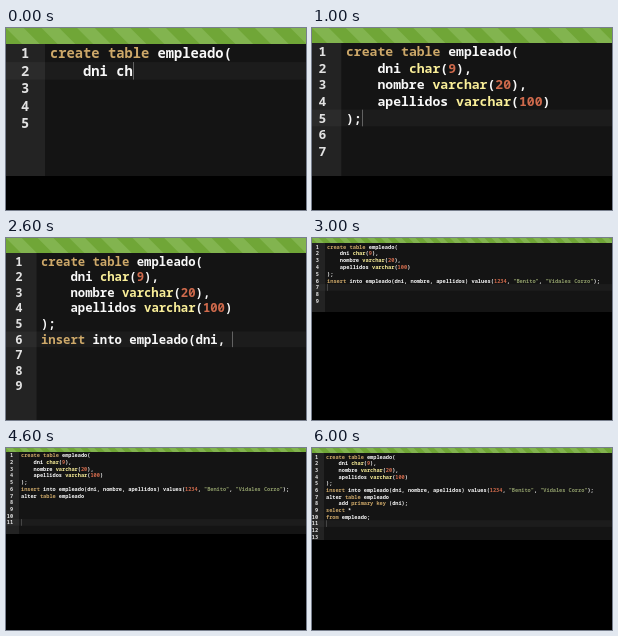
Animation of 300 by 182 pixels, one loop 7 s. Source, as an HTML page with a canvas:

```html
<!DOCTYPE html>
<html lang="es">
<head>
<meta charset="utf-8">
<title>SQL editor</title>
<style>
html, body { margin: 0; width: 100%; height: 100%; overflow: hidden; background: #000; }
canvas { display: block; }
</style>
</head>
<body>
<canvas id="stage" width="300" height="182"></canvas>
<script>
const ctx = document.getElementById('stage').getContext('2d');
const WIDTH = 300, HEIGHT = 182, HOLD = 1000;

const SCRIPT = [
  'create table empleado(',
  '    dni char(9),',
  '    nombre varchar(20),',
  '    apellidos varchar(100)',
  ');',
  'insert into empleado(dni, nombre, apellidos) values(1234, "Benito", "Vidales Corzo");',
  'alter table empleado',
  '    add primary key (dni);',
  'select * ',
  'from empleado;'
];

// x: text start, top: first row, cw: character width, rows: numbered rows,
// typed: [lines, characters of the last line], caret: [row, column]
const VIEWS = [
  { x: 44, top: 16.5, cw: 8.27, rows: 5, bottom: 148, typed: [2, 10], caret: [2, 10] },
  { x: 34, top: 15, cw: 7.86, rows: 7, bottom: 148, typed: [5, 2], caret: [5, 2] },
  { x: 35, top: 15.5, cw: 7.36, rows: 9, bottom: 182, typed: [6, 26], caret: [6, 26] },
  { x: 15, top: 5.2, cw: 3.21, rows: 9, bottom: 74, typed: [6, 85], caret: [7, 0] },
  { x: 15, top: 4.2, cw: 3.155, rows: 11, bottom: 86, typed: [7, 20], caret: [11, 0] },
  { x: 15, top: 4, cw: 3.08, rows: 12, bottom: 88, typed: [9, 9], caret: [9, 9] },
  { x: 14, top: 5.5, cw: 3.15, rows: 13, bottom: 92, typed: [10, 14], caret: [11, 0] }
];

const TOKEN = /"[^"]*"|\w+|[^\s\w"]+/g;
const RULES = [
  [/^"/, '#8f9d6a'],
  [/^\d+$/, '#cf6a4c'],
  [/^(create|table|insert|primary|key|select|from)$/, '#cda869'],
  [/^(var)?char$/, '#f9ee98']
];

function tokenColor(token) {
  const rule = RULES.find(([pattern]) => pattern.test(token));
  return rule ? rule[1] : '#f8f8f8';
}

function fill(color, x, y, w, h) {
  ctx.fillStyle = color;
  ctx.fillRect(x, y, w, h);
}

function drawHeader(height, cw) {
  const period = cw * 4.3;
  ctx.save();
  ctx.beginPath();
  ctx.rect(0, 0, WIDTH, height);
  ctx.clip();
  fill('#70a637', 0, 0, WIDTH, height);
  ctx.fillStyle = '#82b44f';
  for (let x = -period; x < WIDTH; x += period) {
    ctx.beginPath();
    ctx.moveTo(x, 0);
    ctx.lineTo(x + period / 2, 0);
    ctx.lineTo(x + period / 2 + height, height);
    ctx.lineTo(x + height, height);
    ctx.fill();
  }
  ctx.restore();
}

function drawView({ x, top, cw, rows, bottom, typed, caret }) {
  const step = cw * 2.12;
  const rowTop = row => top + (row - 1) * step;
  const baseline = row => rowTop(row) + step * 0.78;

  fill('#000', 0, 0, WIDTH, HEIGHT);
  fill('#141414', 0, 0, WIDTH, bottom);
  fill('#232323', 0, 0, x - cw * 0.6, bottom);
  fill('rgba(255,255,255,0.035)', 0, rowTop(caret[0]), WIDTH, step);
  drawHeader(Math.round(top - 0.3), cw);

  ctx.font = `600 ${cw / 0.6}px "Noto Sans Mono", monospace`;
  ctx.textAlign = 'right';
  ctx.fillStyle = '#e2e2e2';
  for (let row = 1; row <= rows; row++) ctx.fillText(row, x - cw * 2.5, baseline(row));

  ctx.textAlign = 'left';
  const [lines, lastLength] = typed;
  SCRIPT.slice(0, lines).forEach((line, i) => {
    const shown = i === lines - 1 ? line.slice(0, lastLength) : line;
    for (const match of shown.matchAll(TOKEN)) {
      ctx.fillStyle = tokenColor(match[0]);
      ctx.fillText(match[0], x + match.index * cw, baseline(i + 1));
    }
  });

  fill('#626262', Math.round(x + caret[1] * cw), rowTop(caret[0]), cw > 5 ? 1 : 0.6, step);
}

function frame() {
  drawView(VIEWS[Math.floor(performance.now() / HOLD) % VIEWS.length]);
  requestAnimationFrame(frame);
}
frame();
</script>
</body>
</html>
```
